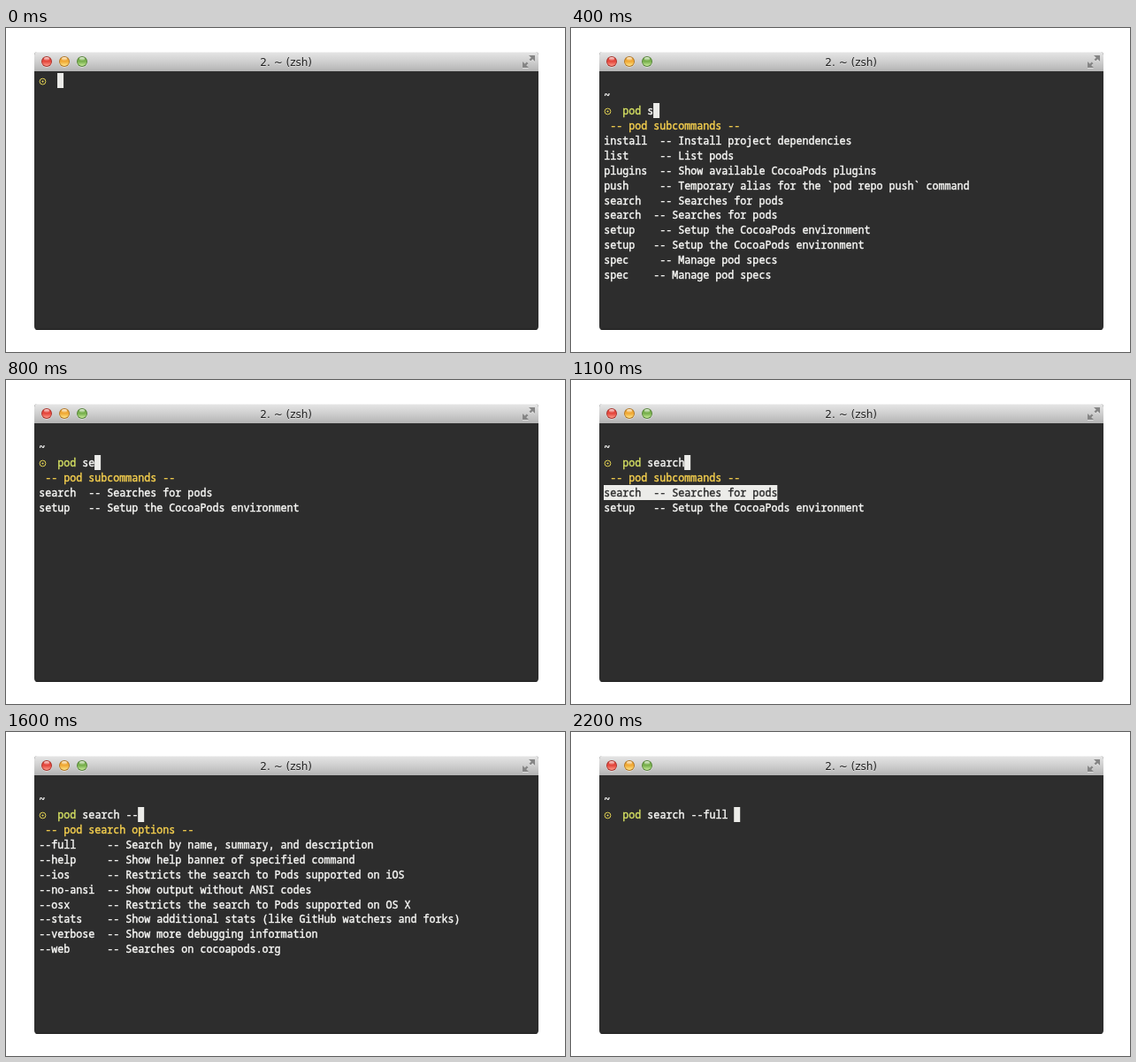
Animation, 632 px wide and 367 px high, one loop 2400 ms. Source, as an HTML page with a canvas:

```html
<!DOCTYPE html>
<html lang="en">
<head>
<meta charset="utf-8">
<title>Terminal completion</title>
<style>
  html, body { margin: 0; width: 100%; height: 100%; overflow: hidden; background: #fff; }
  canvas { display: block; width: 632px; height: 367px; }
</style>
</head>
<body>
<canvas id="stage" width="632" height="367"></canvas>
<script>
const ctx = document.getElementById('stage').getContext('2d');
const LOOP = 2400;
const LEFT = 37, TOP = 51.6, COL = 7.01, ROW = 16.94;
const MONO = '11.68px "Noto Sans Mono", monospace';
const COLORS = {
  back: '#2d2d2d', text: '#fafaf8', block: '#ecece9',
  prompt: '#e3d253', command: '#d3de62', heading: '#f6d04e'
};

const allCommands = {
  title: 'pod subcommands',
  rows: [
    'install  -- Install project dependencies',
    'list     -- List pods',
    'plugins  -- Show available CocoaPods plugins',
    'push     -- Temporary alias for the `pod repo push` command',
    'search   -- Searches for pods',
    'search  -- Searches for pods',
    'setup    -- Setup the CocoaPods environment',
    'setup   -- Setup the CocoaPods environment',
    'spec     -- Manage pod specs',
    'spec    -- Manage pod specs'
  ]
};
const fewCommands = {
  title: 'pod subcommands',
  rows: [
    'search  -- Searches for pods',
    'setup   -- Setup the CocoaPods environment'
  ]
};
const options = {
  title: 'pod search options',
  rows: [
    '--full     -- Search by name, summary, and description',
    '--help     -- Show help banner of specified command',
    '--ios      -- Restricts the search to Pods supported on iOS',
    '--no-ansi  -- Show output without ANSI codes',
    '--osx      -- Restricts the search to Pods supported on OS X',
    '--stats    -- Show additional stats (like GitHub watchers and forks)',
    '--verbose  -- Show more debugging information',
    '--web      -- Searches on cocoapods.org'
  ]
};

// The prompt sits on row 0 until the first completion redraws it on row 2.
const steps = [
  { at: 0, line: '', row: 0 },
  { at: 100, line: 'pod', row: 0 },
  { at: 200, line: 'pod s', row: 0 },
  { at: 400, line: 'pod s', row: 2, list: allCommands },
  { at: 800, line: 'pod se', row: 2, list: fewCommands },
  { at: 1100, line: 'pod search', row: 2, list: fewCommands, selected: true },
  { at: 1300, line: 'pod search ', row: 2 },
  { at: 1500, line: 'pod search -', row: 2 },
  { at: 1600, line: 'pod search --', row: 2, list: options },
  { at: 2100, line: 'pod search --full', row: 2, list: options, selected: true },
  { at: 2200, line: 'pod search --full ', row: 2 }
];

// A thin outline gives the text its heavier weight.
function write(text, col, row, color) {
  const x = LEFT + 0.3 + col * COL, y = TOP + row * ROW + 12.4;
  ctx.fillStyle = ctx.strokeStyle = color;
  ctx.lineWidth = 0.4;
  ctx.fillText(text, x, y);
  ctx.strokeText(text, x, y);
}

function block(col, row, length) {
  const y = Math.round(TOP + row * ROW - 0.5);
  ctx.fillStyle = COLORS.block;
  ctx.fillRect(LEFT + col * COL, y, length * COL, 17);
}

function disc(x, y, r, fill) {
  ctx.fillStyle = fill;
  ctx.beginPath();
  ctx.arc(x, y, r, 0, Math.PI * 2);
  ctx.fill();
}

function fade(y0, y1, ...colors) {
  const g = ctx.createLinearGradient(0, y0, 0, y1);
  colors.forEach((c, i) => g.addColorStop(i / (colors.length - 1), c));
  return g;
}

function light(x, dark, mid, bright) {
  disc(x, 38.7, 6.2, 'rgba(255,255,255,.5)');
  disc(x, 38, 6, dark);
  disc(x, 38, 5.1, fade(33, 43, mid, mid, bright));
  ctx.fillStyle = fade(33, 37, 'rgba(255,255,255,.85)', 'rgba(255,255,255,.1)');
  ctx.beginPath();
  ctx.ellipse(x, 35, 3, 1.9, 0, 0, Math.PI * 2);
  ctx.fill();
}

function arrow(x, y, dir, color) {
  ctx.save();
  ctx.translate(x, y);
  ctx.scale(dir, dir);
  ctx.fillStyle = ctx.strokeStyle = color;
  ctx.beginPath();
  ctx.moveTo(0, 0);
  ctx.lineTo(-7, 0);
  ctx.lineTo(0, 7);
  ctx.fill();
  ctx.lineWidth = 2.4;
  ctx.beginPath();
  ctx.moveTo(-2, 2);
  ctx.lineTo(-5.6, 5.6);
  ctx.stroke();
  ctx.restore();
}

function drawWindow() {
  ctx.fillStyle = '#fff';
  ctx.fillRect(0, 0, 632, 367);
  ctx.save();
  ctx.beginPath();
  ctx.roundRect(32, 27, 570, 315, 4);
  ctx.clip();
  ctx.fillStyle = COLORS.back;
  ctx.fillRect(32, 27, 570, 315);
  ctx.fillStyle = fade(27, 49, '#e6e6e6', '#cfcfcf', '#b3b3b3');
  ctx.fillRect(32, 27, 570, 22);
  ctx.fillStyle = '#f1f1f1';
  ctx.fillRect(32, 27, 570, 1);
  ctx.fillStyle = '#1c1c1c';
  ctx.fillRect(32, 341, 570, 1);
  ctx.restore();

  light(46, '#a5322b', '#e4483e', '#ff9d8c');
  light(66, '#ad7425', '#f0a936', '#ffe78a');
  light(86, '#55803a', '#78b04d', '#c9ec9a');
  for (const [dy, color] of [[1, 'rgba(255,255,255,.5)'], [0, '#858585']]) {
    arrow(598, 31 + dy, 1, color);
    arrow(584, 45 + dy, -1, color);
  }

  ctx.font = '12px "DejaVu Sans", sans-serif';
  ctx.textAlign = 'center';
  ctx.fillStyle = 'rgba(255,255,255,.5)';
  ctx.fillText('2. ~ (zsh)', 316.7, 43.5);
  ctx.fillStyle = '#222';
  ctx.fillText('2. ~ (zsh)', 316.7, 42.5);
}

function drawPrompt(row) {
  const x = LEFT + 4.5, y = TOP + row * ROW + 9;
  disc(x, y, 1.1, COLORS.prompt);
  ctx.strokeStyle = COLORS.prompt;
  ctx.lineWidth = 1;
  ctx.beginPath();
  ctx.arc(x, y, 3.4, 0, Math.PI * 2);
  ctx.stroke();
}

function drawTerminal({ line, row, list, selected }) {
  ctx.font = MONO;
  ctx.textAlign = 'left';
  if (row) write('~', 0, row - 1, COLORS.text);
  drawPrompt(row);
  write(line.slice(0, 3), 3, row, COLORS.command);
  write(line.slice(4), 7, row, COLORS.text);
  block(3 + line.length, row, 1);
  if (!list) return;
  write(`-- ${list.title} --`, 1, row + 1, COLORS.heading);
  list.rows.forEach((text, i) => {
    const active = selected && i === 0;
    if (active) block(0, row + 2, text.length);
    write(text, 0, row + 2 + i, active ? COLORS.back : COLORS.text);
  });
}

function render(now) {
  const t = now % LOOP;
  drawWindow();
  drawTerminal(steps.findLast(step => step.at <= t));
  requestAnimationFrame(() => render(performance.now() - start));
}

const start = performance.now();
render(0);
</script>
</body>
</html>
```
